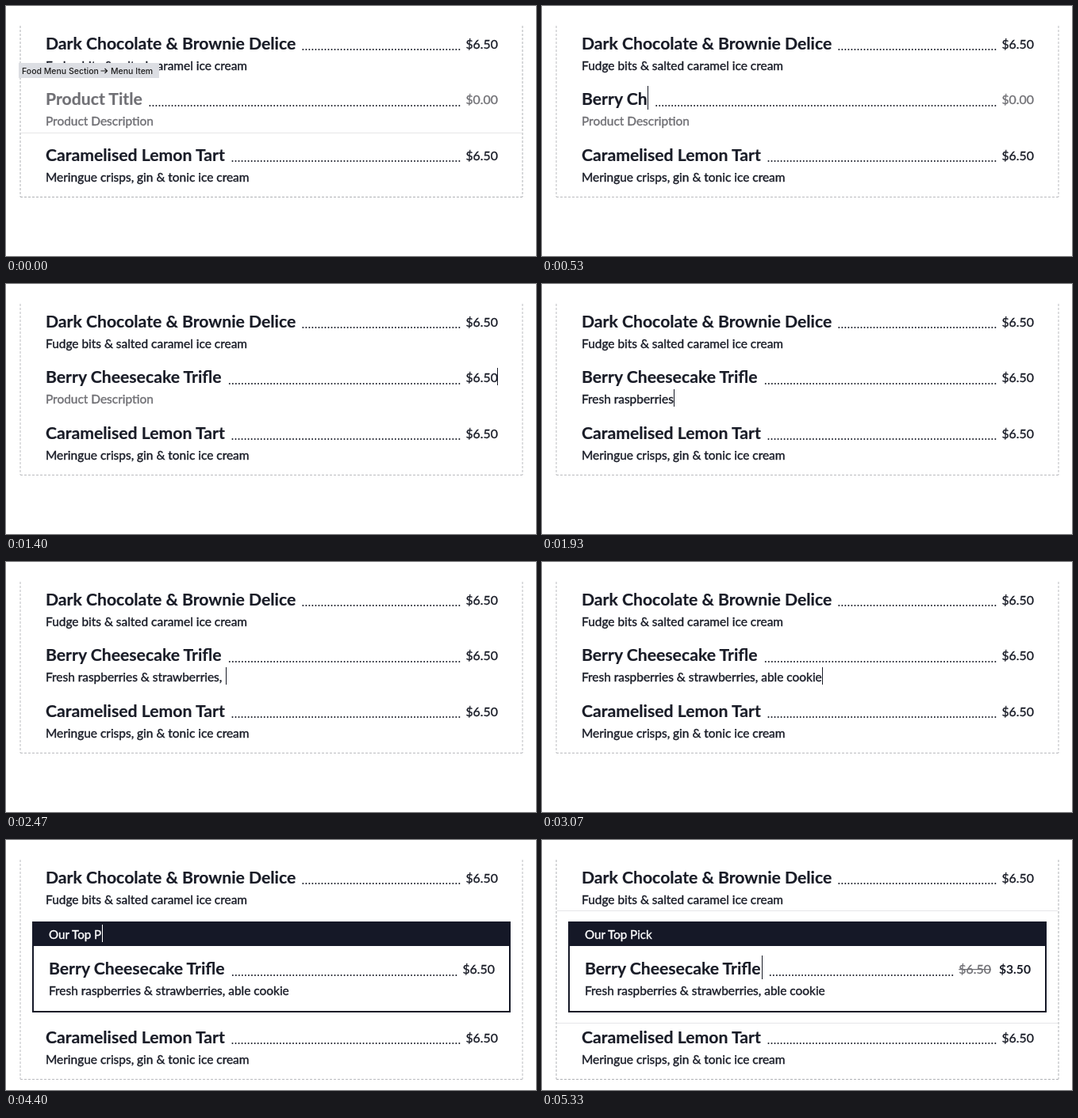
Animation, 668 px wide and 316 px high, one loop 7330 ms. Source, as an HTML page:

```html
<!DOCTYPE html>
<html lang="en">
<head>
<meta charset="utf-8">
<title>Menu editor</title>
<style>
  html, body { margin: 0; width: 100%; height: 100%; overflow: hidden; background: #fff; }
  svg { display: block; width: 668px; height: 316px; }
</style>
</head>
<body>
<svg id="stage" viewBox="0 0 668 316"></svg>
<script>
const LOOP = 7330, TICK = 1000 / 15;
const INK = '#191c27', GREY = '#707075', NAVY = '#151827';
const FONTS = {
  title: { size: 21.2, weight: 700, rim: 0.2 },
  body: { size: 15.45, weight: 400, rim: 0.4 },
  price: { size: 15.9, weight: 400, rim: 0.35 },
  badge: { size: 15.15, weight: 400, rim: 0.35 },
  sale: { size: 15.7, weight: 700, rim: 0 }
};
const FAMILY = 'Lato, "Open Sans", sans-serif';
const NAME = 'Berry Cheesecake Trifle';
const DETAIL = 'Fresh raspberries & strawberries, able cookie';
const BADGE = 'Our Top Pick';

const stage = document.getElementById('stage');
const ruler = document.createElement('canvas').getContext('2d');

const clamp = (v, lo, hi) => Math.max(lo, Math.min(hi, v));
const within = (k, from, to) => k >= from && k < to;
const type = (text, n) => text.slice(0, clamp(Math.round(n), 0, text.length));

function measure(str, kind) {
  const { size, weight } = FONTS[kind];
  ruler.font = `${weight} ${size}px ${FAMILY}`;
  return ruler.measureText(str).width;
}

function text(str, x, y, kind, color = INK) {
  const { size, weight, rim } = FONTS[kind];
  return `<text x="${x}" y="${y}" font-family='${FAMILY}' font-size="${size}" font-weight="${weight}"
    fill="${color}" stroke="${color}" stroke-width="${rim}">${str.replace(/&/g, '&amp;')}</text>`;
}

const rect = (x, y, w, h, fill) =>
  `<rect x="${x}" y="${y}" width="${w}" height="${h}" fill="${fill}"/>`;

function caret(x, baseline, tall, color = INK) {
  return rect(Math.round(x), baseline - (tall ? 24 : 18), 1, tall ? 30 : 22, color);
}

// Dots of 2px, spread evenly so that one sits at each end.
function dots(from, to, y) {
  const length = to - from - 2;
  const step = length / Math.round(length / 4);
  return `<path d="M${from + 1} ${y}H${to - 0.9}" stroke="${INK}" stroke-width="2"
    stroke-linecap="round" stroke-dasharray="0 ${step}"/>`;
}

const divider = y => rect(19, y, 631, 1, '#e6e6e8');

// One menu row; top-line baseline may fall between pixels, text snaps down.
function row(item, x, right, line) {
  const { name, detail, price, sale, edit } = item;
  const y = Math.floor(line);
  const nameEnd = x + measure(name || 'Product Title', 'title');
  const shownPrice = price || '$0.00';
  const saleStart = sale ? right - measure(sale, 'sale') : right;
  const priceEnd = sale ? saleStart - 10 : right;
  const priceStart = priceEnd - measure(shownPrice, 'price');
  const titleCaret = edit === 'name';
  let out = text(name || 'Product Title', x, y, 'title', name ? INK : GREY)
    + text(detail || 'Product Description', x, y + 26, 'body', detail ? INK : GREY)
    + text(shownPrice, priceStart, y - 1, 'price', price && !sale ? INK : GREY)
    + dots(nameEnd + (titleCaret ? 10 : 8), priceStart - 7, Math.round(line));
  if (sale) {
    out += rect(priceStart, y - 7, priceEnd - priceStart, 1.2, GREY)
      + text(sale, saleStart, y - 1, 'sale');
  }
  if (titleCaret) out += caret(name ? nameEnd : x, y, true);
  if (edit === 'detail') out += caret(x + measure(detail, 'body') + 0.5, y + 26, false);
  if (edit === 'price') out += caret(right - 1, y - 1, false);
  if (edit === 'sale') out += caret(saleStart + measure('$3', 'sale'), y - 1, false);
  return out;
}

function frame(bottom, color) {
  return `<path d="M18 25V${bottom}M651 25V${bottom}M18 ${bottom + 0.5}H651.5"
    fill="none" stroke="${color}" stroke-width="1" stroke-dasharray="3 2"/>`;
}

function label() {
  const word = (str, x) => `<text x="${x}" y="86" font-family="Inter, sans-serif"
    font-size="10.5" font-weight="500" fill="#1e1e1e">${str}</text>`;
  return rect(16, 72, 177, 19, '#dcdee3') + word('Food Menu Section', 20) + word('Menu Item', 132)
    + '<path d="M119.5 82H127.5M124.5 79L127.5 82L124.5 85" fill="none" stroke="#1e1e1e" stroke-width="1.2"/>';
}

function editing(k) {
  if (within(k, 4, 15) || k >= 80) return 'name';
  if (within(k, 18, 22)) return 'price';
  if (within(k, 22, 44) || within(k, 46, 54)) return 'detail';
  if (within(k, 77, 79)) return 'sale';
  return '';
}

function badge(k) {
  const typed = type(BADGE, (clamp(k, 57, 60) - 57 + Math.max(0, k - 62)) * 4 / 3);
  let out = `<rect x="34" y="104" width="601" height="113" fill="#fff" stroke="${NAVY}" stroke-width="2"/>`
    + rect(33, 103, 603, 31, NAVY) + text(typed, 54, 125, 'badge', '#fff');
  if (within(k, 58, 70)) out += caret(54 + measure(typed, 'badge') + 0.5, 125, false, '#fff');
  return out;
}

function draw(k) {
  const featured = k >= 54;
  const hover = k < 4 || within(k, 54, 63) || k >= 70;
  const shift = featured ? 61 : 0;
  const item = {
    name: k < 4 ? '' : type(NAME, 8 + (k - 8) * 2.5),
    price: k < 18 ? '' : type('$6.50', (k - 17) * 1.3),
    detail: k < 22 ? '' : type(DETAIL, k <= 41 ? 17 + (k - 29) * 2.15 : k + 2),
    sale: k < 70 ? '' : k < 77 ? '$6.50' : '$3.50',
    edit: editing(k)
  };
  let out = frame(241 + shift, hover ? '#b0b2b6' : '#bbbcc0');
  if (hover) out += featured ? divider(89) + divider(231) : divider(160);
  out += row({ name: 'Dark Chocolate & Brownie Delice', detail: 'Fudge bits & salted caramel ice cream', price: '$6.50' }, 50, 620, 55);
  out += featured ? badge(k) + row(item, 54, 616, 170.5) : row(item, 50, 620, 125.5);
  out += row({ name: 'Caramelised Lemon Tart', detail: 'Meringue crisps, gin & tonic ice cream', price: '$6.50' }, 50, 620, 196 + shift);
  if (k === 1) out += caret(49, 196, true);
  if (k < 4) out += label();
  stage.innerHTML = out;
}

let shown = -1;
function tick() {
  const k = Math.floor((performance.now() % LOOP + 4) / TICK);
  if (k !== shown) draw(shown = k);
  requestAnimationFrame(tick);
}
tick();
</script>
</body>
</html>
```
